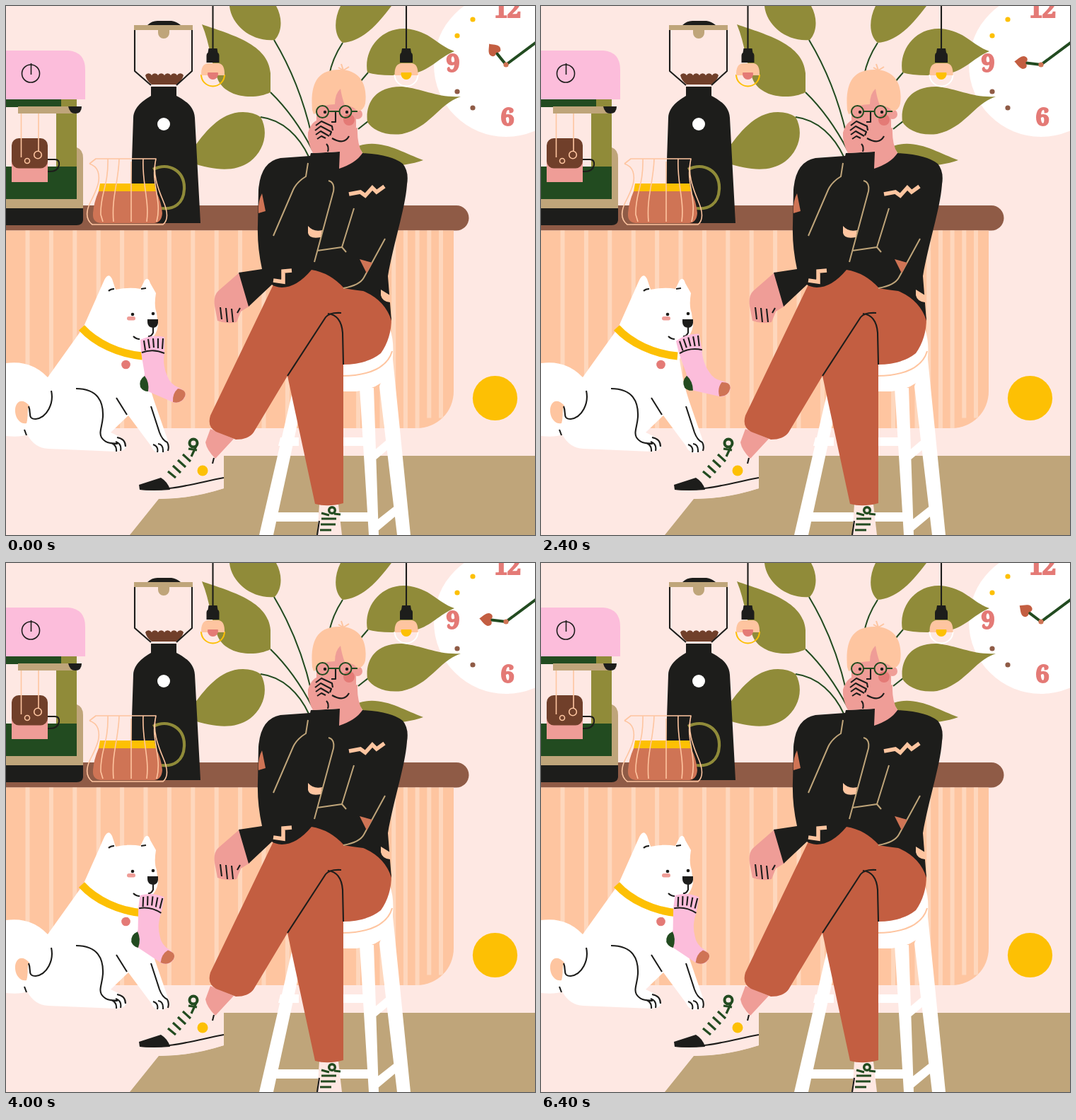
These frames come from a looping animation (748x748 px, 7200 ms). An HTML page:

```html
<!DOCTYPE html>
<html lang="en">
<head>
<meta charset="utf-8">
<title>Coffee bar</title>
<style>
html, body { margin: 0; width: 100%; height: 100%; overflow: hidden; background: #fee8e3 }
svg { display: block; width: 100%; height: 100% }
.ink, .thin, .seam, .lace, .stem { fill: none; stroke-linejoin: round }
.ink { stroke: #1d1d1b; stroke-width: 2.1 }
.thin { stroke: #fec5a0; stroke-width: 1.6 }
.seam { stroke: #bfa57a; stroke-width: 2 }
.lace { stroke: #224b20; stroke-width: 4 }
.stem { stroke: #224b20; stroke-width: 2 }
.black { fill: #1d1d1b } .white { fill: #fff } .blush { fill: #fee8e3 }
.peach { fill: #fec5a0 } .tan { fill: #bfa57a } .olive { fill: #908b39 }
.green { fill: #224b20 } .yellow { fill: #fdc004 } .pink { fill: #fcbddb }
.skin { fill: #ef9d97 } .coral { fill: #e47a76 } .rust { fill: #c35e41 }
.clay { fill: #cf7455 } .brown { fill: #703f2a } .wood { fill: #8f5b46 }
text { font: 900 34px "Noto Serif", serif; text-anchor: middle; stroke: #e47a76; stroke-width: 2 }
</style>
</head>
<body>
<svg viewBox="0 0 748 748">
  <rect class="blush" width="748" height="748"/>
  <path class="tan" d="M308 636H748V748H175L216 697Q260 697 308 682Z"/>

  <g id="clock">
    <circle class="white" cx="707" cy="83" r="102"/>
    <g class="coral"><text x="709" y="15.500">12</text><text x="632" y="93">9</text><text x="709" y="169">6</text></g>
    <g class="yellow"><circle cx="660" cy="19" r="3.6"/><circle cx="638" cy="42" r="3.6"/></g>
    <g class="wood"><circle cx="638" cy="121" r="3.6"/><circle cx="660" cy="144" r="3.6"/></g>
    <path class="lace" d="M707 83L750 51"/>
    <g id="hour">
      <path class="lace" d="M707 83H684"/>
      <path class="rust" d="M669 83C673 80 677 74 682 74Q688 75 687 80L685 83L687 86Q688 91 682 92C677 92 673 86 669 83Z"/>
    </g>
    <circle class="clay" cx="707" cy="83" r="3.6"/>
  </g>

  <g id="plant">
    <path class="stem" d="M379 48Q415 108 432 182M374 122Q408 155 434 205M360 157C392 161 415 185 428 213M476 52Q461 75 457 98M512 94L495 114M512 163L498 174"/>
    <path class="olive" d="M316 0C319 28 348 51 380 48C391 36 391 16 382 0ZM277 26C320 41 371 54 374 95V122C352 133 312 130 300 105C290 83 289 55 277 26ZM360 157C372 178 365 205 345 220C322 236 295 232 262 222V205C280 180 302 150 335 150Q350 150 360 157ZM473 0C463 20 464 42 476 52C505 50 526 25 545 0ZM511 94C505 62 530 30 565 32C600 35 610 56 634 64C610 74 600 92 570 97Q530 100 511 94ZM511 164C508 140 520 113 560 114C590 117 610 130 643 128C610 140 600 172 560 181C535 184 518 175 511 164ZM498 198C530 187 560 207 590 218C568 226 540 228 515 225Z"/>
  </g>

  <g id="lamps"></g>

  <rect class="wood" x="-20" y="282" width="674.5" height="35.5" rx="17.7"/>
  <path class="peach" d="M0 317.500H633V545A52 52 0 0 1 581 597H0Z"/>
  <g id="stripes" fill="#fed7bd"></g>

  <g id="machine">
    <path class="pink" d="M0 63H88Q112 65 112 90V132H0Z"/>
    <circle class="ink" cx="35" cy="95.500" r="12.500" style="stroke-width:1.600"/>
    <path class="ink" d="M35.500 81V97" style="stroke-width:1.600"/>
    <path class="blush" d="M0 142H71V228H0Z"/>
    <path class="olive" d="M71 132H100V228H71Z"/>
    <path class="green" d="M0 132H78V143H0ZM0 227H100V274H0Z"/>
    <path class="tan" d="M17 142H98V152H17ZM100 200Q109 203 109 215V286H0V273H100Z"/>
    <path class="black" d="M88 142H107Q107 152 98 152Q90 152 88 142ZM0 286H109V303Q108 310 100 310H0Z"/>
    <path class="skin" d="M8 215H59V249H8Z"/>
    <rect class="brown" x="8" y="187" width="51" height="42.500" rx="10"/>
    <path class="thin" d="M21.500 152V214M46 152V205"/>
    <circle class="thin" cx="30" cy="219" r="3.500"/><circle class="thin" cx="45" cy="210.500" r="5.300"/>
    <path class="ink" d="M59 217H69Q76 217 75 225Q73 234 62 234H59"/>
  </g>

  <g id="grinder">
    <path class="black" d="M200 27Q206 21 214 21H234Q241 22 247 27ZM205 114H241V127C252 133 266 141 267 158L275 307H175L180 158C181 142 195 133 205 127Z"/>
    <path class="tan" d="M181 27H264V34H181ZM215 34H231V38A8 8 0 0 1 215 38Z"/>
    <path class="brown" d="M197 98a5 5 0 0 1 9 0a5 5 0 0 1 9 0a5 5 0 0 1 9 0a5 5 0 0 1 9 0a5 5 0 0 1 9 0a5 5 0 0 1 9 0Q249 106 241 111H206Q199 106 197 98Z"/>
    <path class="ink" d="M182 34V92L205 112M263 34V92L241 112"/>
    <circle class="white" cx="223" cy="167" r="9"/>
  </g>

  <g id="carafe">
    <path d="M208 231C230 220 253 233 252 259C251 280 237 288 220 286" fill="none" stroke="#908b39" stroke-width="4.200"/>
    <path class="clay" d="M131 262H212Q220 277 221 293Q220 306 210 307H134Q122 306 123 293Q124 278 131 262Z"/>
    <path class="yellow" d="M133 251H210L212 262H131Z"/>
    <path class="thin" d="M118 223L127 216H212C207 236 214 256 222 275Q233 300 222 309H122Q109 299 119 278C132 253 133 244 130 234Q127 226 118 223M144 216C145 255 133 265 134 295L137 305M160 216C159 250 149 270 152 305M177 220V305M194 216C192 250 203 275 199 305M211 222C205 250 221 275 213 305"/>
  </g>

  <circle class="yellow" cx="691.500" cy="554.500" r="31.600"/>

  <g id="dog">
    <path class="white" d="M59 525L109 455L137 392Q144 374 150 386L155 401Q175 397 190 400L196 388Q201 382 204 392L212 406Q209 424 213 434L215 452Q213 464 206 470L196 500Q200 530 209 557L228 612Q235 626 223 631Q210 635 205 622L173 579L148 603Q169 612 170 623Q168 630 155 630L60 626Q40 625 30 606Q20 610 0 608V505Q35 500 59 525Z"/>
    <path class="peach" d="M33 565C22 553 12 560 13 574C14 585 22 592 29 590C32 581 29 572 33 565Z"/>
    <path class="ink" d="M32 566C36 575 30 584 42 584C58 582 68 562 64 544M99 541C130 541 138 560 137 581C136 595 131 603 135 610C141 619 149 618 158 619M157 610Q169 612 169 623M155 616Q164 619 162 629M149 618Q157 621 156 630M156 554L171 578M205 566L217 603Q221 614 228 617Q231 622 229 629M215 619Q223 620 222 631M208 620Q216 623 214 631M26 599L29 607M145 403Q148 400 153 400M191 400L198 399M208 453V462Q205 468 201 467M180 467Q184 471 189 471"/>
    <g class="black"><circle cx="179" cy="436" r="2.300"/><circle cx="208" cy="435" r="2.300"/><path d="M200 443H215V448Q214 455 208 455Q200 454 200 447Z"/></g>
    <rect class="skin" x="171" y="439" width="12" height="5.500" rx="2.700"/>
    <path d="M107 455C127 477 160 492 193 495" fill="none" stroke="#fdc004" stroke-width="11"/>
    <circle class="coral" cx="169.500" cy="507" r="6.300"/>
  </g>

  <g id="sock">
    <path class="pink" d="M190 472Q206 464 224 468V490Q221 508 228 523Q232 535 245 540Q256 545 253 553Q248 562 238 561L201 545Q192 540 196 520L191 490Z"/>
    <path class="green" d="M196 523Q187 529 190 539Q194 545 201 545Q203 532 196 523Z"/>
    <path class="clay" d="M243 541Q256 543 253 552Q248 563 236 560Q235 548 243 541Z"/>
    <path class="ink" d="M192 490Q208 484 224 491M195 473L197 487M201 471L203 484M208 470L209 483M215 470V484M222 470L221 485"/>
  </g>

  <g id="stool" class="white">
    <path d="M405 545H422L378 748H358ZM500 540H520L527 748H513ZM528 538L546 490L572 748H553ZM388 610H414V622H385ZM470 610H510V622H470ZM366 716H442V729H364ZM470 716H520V729H470ZM520 629L546 607V622L521 643ZM523 728L556 702V717L525 743Z"/>
    <path d="M470 500L543 456Q550 478 546 505Q541 540 495 545H470Z"/>
    <path class="thin" d="M475 523C515 523 540 510 546 488" style="stroke-width:2"/>
  </g>

  <g id="shoes">
    <path class="blush" d="M188 677L220 667L262 614H290L308 639V682Q262 697 216 697L189 684ZM443 705H470L475 748H440Z"/>
    <path class="black" d="M188 677L219 667Q229 673 232 684Q208 686 189 684Z"/>
    <path class="skin" d="M289 598L322 612L296 640Q284 628 282 617Z"/>
    <path class="ink" d="M190 683C230 687 270 674 308 667M294 639L292 647M443 728L440 748"/>
    <path class="lace" d="M229 658L240 667M236 650L247 660M243 642L254 652M250 634L261 644M258 626L270 628M269 622L262 637M446 717L457 720M446 725H467M445 733H466M444 741H460M464 718L473 719" style="stroke-width:3.200"/>
    <circle class="lace" cx="265" cy="618" r="5.500"/><circle class="lace" cx="461" cy="713" r="4.300" style="stroke-width:3.500"/>
    <circle class="yellow" cx="278" cy="657" r="7.500"/>
  </g>

  <g id="trousers">
    <path class="rust" d="M378 394L405 392L432 370L465 376L500 398Q533 410 545 441Q545 470 530 491Q510 507 477 507V703Q455 709 437 704L398 523L350 603Q343 613 325 613L297 602Q284 595 289 579Z"/>
    <path class="ink" d="M398 523L452 440Q457 433 474 434M455 435Q474 437 476 462L477 507"/>
  </g>

  <g id="jumper">
    <path class="skin" d="M331 376L300 403Q293 410 295 424L299 445Q312 450 326 447L332 432L345 424ZM466 180L497 172Q496 195 504 208Q495 229 470 231Z"/>
    <path class="black" d="M431 208L472 206L471 230Q495 222 504 208Q545 210 561 223Q570 234 567 252C565 285 548 335 540 382L545 445Q536 416 505 403Q488 401 478 399Q458 377 432 373Q411 398 390 398Q380 397 376 394L343 425L329 377L362 372Q355 340 356 310L357 260Q360 220 388 215L430 212Z"/>
    <path class="ink" d="M303 426L305 443M311 427L313 447M319 428L321 447M331 427L327 434"/>
    <path class="seam" d="M427 222L424 241Q411 249 406 260L378 325M456 247Q465 249 463 262L436 362M440 346L475 341L492 286M475 341L481 348M536 329L506 384Q500 395 477 399"/>
    <path d="M485 266L501 263L508 268L518 257L524 263L535 255M378 388L392 390V375L404 374" fill="none" stroke="#fec5a0" stroke-width="5.500"/>
    <path class="peach" d="M427 311Q435 320 447 317L445 327Q429 330 427 321ZM530 401L543 409V419Q532 418 530 409Z"/>
    <path class="clay" d="M362 265L367 290L357 293Q356 276 362 265ZM500 358L518 363L510 378Z"/>
  </g>

  <g id="head">
    <circle class="skin" cx="497" cy="153" r="7"/>
    <path class="skin" d="M439 140L460 115H482L495 140V172Q486 193 468 195Q448 190 439 165Z"/>
    <path class="peach" d="M433 147C430 110 440 90 471 90C504 90 511 115 508 138Q506 148 496 149Q495 143 479 140Q475 130 473 117Q465 124 465 139Q450 139 441 145Q439 152 435 153Z"/>
    <path class="thin" d="M470 87L477 91L485 86M477 91L474 82" style="stroke-width:2"/>
    <circle class="coral" cx="485" cy="161" r="8"/>
    <path class="skin" d="M446 159Q432 162 427 179Q426 193 434 208L471 206Q474 190 463 170Q459 160 446 159Z"/>
    <path class="ink" d="M466 150V164H460M438 169L446 163L461 170L462 176M437 176L445 170L460 178L458 183M438 182L445 177L457 184M440 188L446 184L452 187M453 195Q457 199 455 206M461 187Q478 197 485 184"/>
    <path class="stem" d="M456 149H471M489 149H497"/>
    <circle class="stem" cx="447.500" cy="149.500" r="8.500"/><circle class="stem" cx="480" cy="149.500" r="8.500"/>
    <circle class="black" cx="451" cy="150" r="2.200"/><circle class="black" cx="482" cy="150" r="2.200"/>
  </g>
</svg>
<script>
const byId = id => document.getElementById(id);

const lamp = (x, ring, bulb) => `<g transform="translate(${x})">
  <path d="M-16.500 97A16.500 16.500 0 0 0 16.500 97" fill="none" stroke="${ring}" stroke-width="2"/>
  <path class="peach" d="M-16.500 98Q-17 82 -7 81H8Q17 82 16.500 98Z"/>
  <circle class="${bulb}" cy="96.500" r="7.500"/>
  <path class="peach" d="M-9 88H9V94H-9Z"/>
  <path class="ink" d="M0 0V62"/>
  <path class="black" d="M-6 60H6L7 66Q9 67 9 70V80H-9V70Q-9 67 -7 66Z"/></g>`;
byId('lamps').innerHTML = lamp(292.5, '#fdc004', 'coral') + lamp(566, '#fff', 'yellow');

// Slats stand twice as close on the rounded end of the counter.
const slat = i => 27.5 + 33.4 * (i < 16 ? i : 15 + (i - 15) / 2);
byId('stripes').innerHTML = Array.from({ length: 21 }, (_, i) =>
  `<rect x="${slat(i)}" y="317.500" width="6" height="${i < 19 ? 279.5 : 265}"/>`).join('');

// One pose per step, held without easing.
const STEP = 800;
const hourAngles = [51, 37, 23, 7, -7, 7, 23, 30, 37];
const sockSwing = [0, -1, -1, -1, 0, 1, 1, 1, 1];

function draw(now) {
  const step = Math.floor(now / STEP) % hourAngles.length;
  byId('hour').setAttribute('transform', `rotate(${hourAngles[step]} 707 83)`);
  byId('sock').setAttribute('transform', `rotate(${sockSwing[step] * 10.5} 200 468)`);
}

const start = performance.now();
function tick() {
  draw(performance.now() - start);
  requestAnimationFrame(tick);
}
tick();
</script>
</body>
</html>
```
